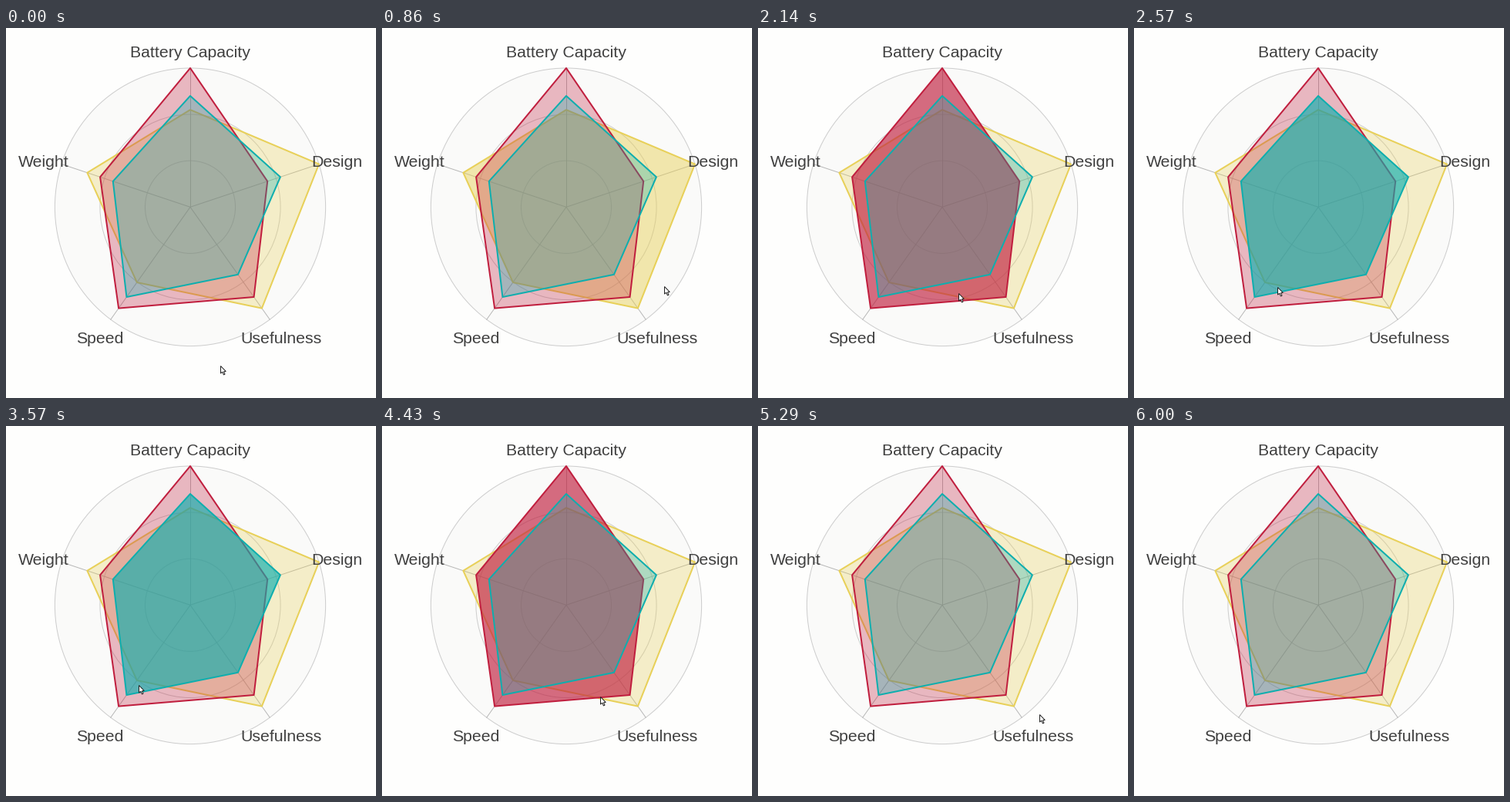
Write a matplotlib script that moves like this. It is 480 by 480 pixels and loops after 7570 ms.

```python
import numpy as np
import matplotlib.pyplot as plt
from matplotlib.animation import FuncAnimation
from matplotlib.patches import Ellipse, Polygon

SIZE, DPI = 480, 96
PT = 72 / DPI
LOOP_MS = 7570
STEPS, SUBSTEPS = 53, 5
FRAMES = STEPS * SUBSTEPS

CENTER = np.array([239.0, 232.3])
RADIUS = np.array([175.6, 180.3])
ANGLES = np.arange(5) * 2 * np.pi / 5
SPOKES = np.column_stack([np.sin(ANGLES), -np.cos(ANGLES)])
LABELS = ["Battery Capacity", "Design", "Usefulness", "Speed", "Weight"]

# Colour and values in label order, from back to front
SERIES = {
    "yellow": ("#e8d058", [0.7, 1.0, 0.9, 0.67, 0.8]),
    "red": ("#c01e3e", [1.0, 0.6, 0.8, 0.9, 0.7]),
    "teal": ("#0eaeae", [0.8, 0.7, 0.6, 0.8, 0.6]),
}
REST, ACTIVE = 0.3, 0.65

# Hovered series: (name, first step, last step)
HOVERS = [("yellow", 6, 12), ("red", 13, 16), ("teal", 17, 26),
          ("red", 27, 31), ("yellow", 32, 35)]

# Pointer path: step, x, y
PATH = np.array([
    (0, 278, 438), (3, 326, 408), (6, 366, 335), (8, 364, 308),
    (10, 344, 322), (12, 319, 346), (14, 284, 347), (16, 235, 342),
    (18, 186, 336), (20, 168, 332), (23, 172, 336), (25, 172, 336),
    (28, 222, 342), (31, 283, 351), (34, 325, 363), (37, 365, 374),
    (40, 457, 428), (41, 458, 429),
])
ARROW = np.array([(0, 0), (0, 9.6), (2.3, 7.6), (3.9, 11.4),
                  (5.5, 10.7), (4, 7.2), (6.8, 7)]) + 0.5
POINTER_GONE = 42


def place(values):
    """Points on the five spokes at the given fractions of the radius."""
    return CENTER + SPOKES * RADIUS * np.reshape(values, (-1, 1))


fig = plt.figure(figsize=(SIZE / DPI, SIZE / DPI), dpi=DPI, facecolor="#fefefd")
ax = fig.add_axes([0, 0, 1, 1])
ax.set_xlim(0, SIZE)
ax.set_ylim(SIZE, 0)
ax.axis("off")

for level in (1, 2 / 3, 1 / 3):
    ax.add_patch(Ellipse(CENTER, *(2 * RADIUS * level), facecolor="#fafaf9",
                         edgecolor="#cdcdcd", linewidth=PT, zorder=1))
for x, y in place(np.ones(5)):
    ax.plot([CENTER[0], x], [CENTER[1], y], color="#b8b8b8",
            linewidth=PT, zorder=2)

fills = {}
for depth, (name, (color, values)) in enumerate(SERIES.items()):
    points = place(values)
    fills[name] = ax.add_patch(Polygon(points, facecolor=color, alpha=REST,
                                       linewidth=0, zorder=3 + depth))
    ax.add_patch(Polygon(points, fill=False, edgecolor=color, linewidth=2 * PT,
                         joinstyle="round", zorder=3.5 + depth))

for label, (x, y) in zip(LABELS, place(np.full(5, 1.14))):
    ax.text(x, y + 10.9, label, ha="center", va="baseline", color="#404040",
            family="Liberation Sans", fontsize=21.3 * PT, zorder=8)

pointer = ax.add_patch(Polygon(ARROW, facecolor="white", edgecolor="#222222",
                               linewidth=PT, zorder=9))


def hovered(name, step):
    return any(n == name and a <= step <= b for n, a, b in HOVERS)


def update(frame):
    step = min((frame + 1) // SUBSTEPS, STEPS - 1)
    for name, fill in fills.items():
        # Each change of hover fades over one step
        amount = (hovered(name, step) + hovered(name, step - 1)) / 2
        fill.set_alpha(REST + (ACTIVE - REST) * amount)
    tip = [np.interp(step, PATH[:, 0], PATH[:, k]) for k in (1, 2)]
    pointer.set_xy(ARROW + np.round(tip))
    pointer.set_visible(step < POINTER_GONE)
    return [*fills.values(), pointer]


anim = FuncAnimation(fig, update, frames=FRAMES, interval=LOOP_MS / FRAMES,
                     repeat=True, repeat_delay=0)
plt.show()
```
